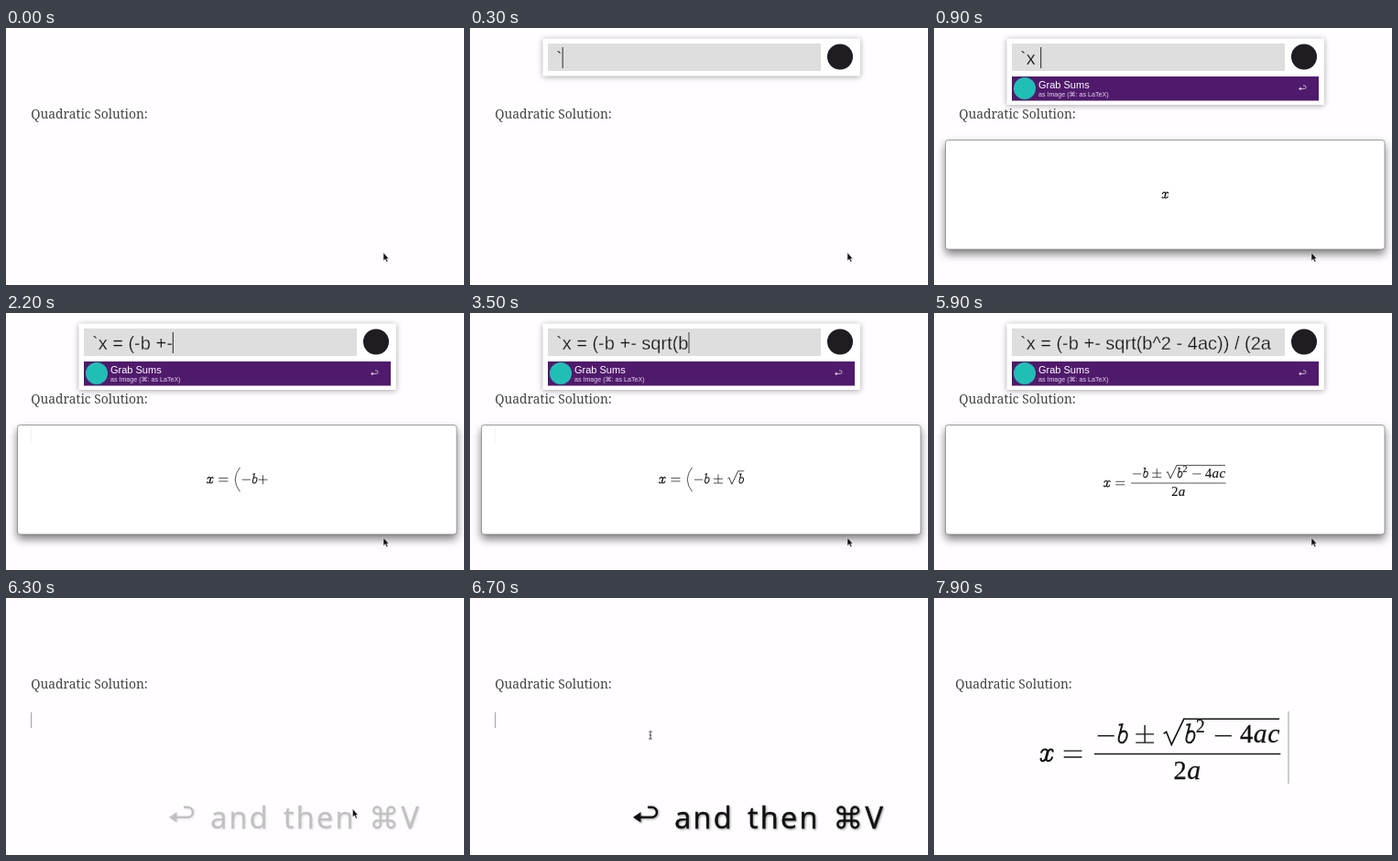
An HTML page for the animation above (8100 ms loop, 500 px wide and 281 px high).

```html
<!DOCTYPE html>
<html lang="en">
<head>
<meta charset="utf-8">
<title>Quadratic solution</title>
<style>
  html, body { margin: 0; width: 100%; height: 100%; overflow: hidden; background: #fffdff; }
  svg { display: block; width: 100vw; height: 100vh; }
  text { white-space: pre; }
  .sans { font-family: "Liberation Sans", Arial, sans-serif; }
  .serif { font-family: "Noto Serif", serif; }
  .big {
    font-family: "Open Sans", "Noto Sans", sans-serif; font-size: 32.5px; letter-spacing: 2.3px;
    stroke: #111; stroke-width: .5px;
  }
  .math { font-family: "Liberation Serif", "Times New Roman", serif; fill: #151515; }
  #search { filter: drop-shadow(0 1px 3px rgba(0, 0, 0, .35)); }
  #preview rect { filter: drop-shadow(0 5px 5px rgba(0, 0, 0, .5)); }
  #hint { filter: drop-shadow(1px 1px 1px rgba(0, 0, 0, .4)); }
</style>
</head>
<body>
<svg viewBox="0 0 500 281">
  <defs>
    <g id="return">
      <path d="M16 0H20.5a5.5 5.5 0 0 1 0 11H7" fill="none" stroke="currentColor" stroke-width="2.5"/>
      <path d="M0 11L8.5 5.2V16.8Z" fill="currentColor"/>
    </g>
  </defs>
  <text id="heading" class="serif" y="99.3" font-size="13.8" fill="#444">Quadratic Solution:</text>

  <g id="preview">
    <rect x="12.5" y="122.5" width="479.5" height="119.5" rx="3" fill="#fff" stroke="#777" stroke-width=".7"/>
    <g id="formula" class="math"></g>
  </g>
  <path id="docCaret" d="M27.5 125V142" stroke="#777" stroke-width=".9"/>

  <g id="search">
    <rect id="panel" x="79.5" y="11.5" width="346.5" height="72.5" rx="1" fill="#fff"/>
    <rect x="85" y="17" width="298" height="30" fill="#dedede"/>
    <text id="query" class="sans" x="94" y="40" font-size="20" fill="#151515" stroke="#dedede" stroke-width=".3"></text>
    <path id="caret" d="M0 21V44" stroke="#222"/>
    <circle cx="404" cy="31.5" r="14" fill="#1f1c22"/>
    <g id="result" class="sans">
      <rect x="85" y="53" width="335" height="26.5" fill="#501a6c"/>
      <circle cx="99" cy="66" r="12" fill="#20bfb6"/>
      <text x="114" y="65.5" font-size="11" fill="#fff">Grab Sums</text>
      <text x="114" y="75" font-size="7.1" fill="#e3d6ea">as Image (<tspan font-family="DejaVu Sans, sans-serif">⌘</tspan>: as LaTeX)</text>
      <use href="#return" transform="translate(398 63) scale(.31)" color="#e8deee"/>
    </g>
  </g>

  <g id="hint" fill="#111">
    <use href="#return" x="178" y="228.7" color="#111"/>
    <text class="big" x="223.2" y="251.8">and</text>
    <text class="big" x="303" y="251.8">then</text>
    <path transform="translate(412.7 239.8) scale(.84)" fill="none" stroke="#111" stroke-width="3"
      d="M-4.5 -9A4.5 4.5 0 1 0 -9 -4.5H9A4.5 4.5 0 1 0 4.5 -9V9A4.5 4.5 0 1 0 9 4.5H-9A4.5 4.5 0 1 0 -4.5 9Z"/>
    <text class="big" x="431.5" y="251.8">V</text>
  </g>

  <g id="pasted" class="math"></g>
  <path id="pasteCaret" d="M387 124V203" stroke="#b4b4b4" stroke-width="1.3"/>
  <path id="arrow" d="M0 0V9L2 7.2L3.6 10.6L5 10L3.6 6.7H6Z" fill="#111" stroke="#fff" stroke-width=".5"/>
  <path id="beam" d="M-1.7 -4H1.7M0 -4V4M-1.7 4H1.7M-1 0H1" fill="none" stroke="#333" stroke-width=".9"/>
</svg>
<script>
const LOOP = 8100, STEP = 100;
const INPUT = "`x = (-b +- sqrt(b^2 - 4ac)) / (2a";
// [time, characters typed]
const TYPING = [[300, 1], [800, 3], [3200, 18], [3450, 18], [4450, 24], [5700, 34]];

const el = {};
document.querySelectorAll("[id]").forEach(e => el[e.id] = e);
const clamp = v => Math.max(0, Math.min(1, v));
const ramp = (t, a, b) => clamp((t - a) / (b - a));
const show = (e, opacity) => e.setAttribute("opacity", +opacity);
const move = (e, x, y) => e.setAttribute("transform", `translate(${x} ${y})`);

// Advance widths and drawn signs, in em
const WIDTH = {
  x: .572, a: .519, b: .429, c: .433, s: .469, q: .46, r: .451, 2: .5, 4: .5, "²": .4,
  "=": .778, "−": .778, "+": .778, "±": .778, "√": .833, "(": .597, ")": .597, "]": 0
};
const SIGN = {
  x: "M.07 -.285C.1 -.39 .18 -.425 .23 -.422C.3 -.415 .31 -.36 .295 -.3L.24 -.09" +
     "C.22 -.03 .18 .005 .13 .005C.08 .005 .055 -.03 .06 -.07L.1 -.09" +
     "M.485 -.15C.46 -.05 .39 .005 .335 .005C.27 .005 .255 -.05 .275 -.12L.33 -.33" +
     "C.35 -.39 .385 -.423 .435 -.423C.49 -.423 .505 -.38 .5 -.35L.465 -.34",
  b: "M.08 -.65L.21 -.67L.09 -.2C.05 -.05 .13 .005 .19 .005C.29 .005 .385 -.14 .385 -.275" +
     "C.385 -.37 .34 -.42 .27 -.42C.21 -.42 .16 -.38 .13 -.33",
  "=": "M.056 -.365H.722M.056 -.135H.722",
  "−": "M.083 -.25H.694",
  "+": "M.056 -.25H.722M.389 -.58V.08",
  "±": "M.056 -.31H.722M.389 -.64V0M.056 0H.722",
  "√": "M.08 -.33L.18 -.4L.37 .08L.835 -.89",
  "(": "M.53 -1.14Q-.16 -.25 .53 .62",
  ")": "M.07 -1.14Q.76 -.25 .07 .62"
};
const WEIGHT = { x: .068, b: .068, "√": .055 };

const stroke = (d, x, y, size, weight = .048) =>
  `<path d="${d}" transform="translate(${x} ${y}) scale(${size})" fill="none" stroke="#151515" stroke-width="${weight}"/>`;

const glyph = (c, x, y, size, style) =>
  `<text x="${x}" y="${y}" font-size="${size}" font-style="${style}" stroke="#151515" stroke-width="${size * .01}">${c}</text>`;

// One line of maths; "]" ends the root
function setLine(str, x, y, size) {
  let pen = 0, root = 0, svg = "";
  [...str].forEach((c, i) => {
    const binary = /[−+±]/.test(c) && /[a-z0-9²]/.test(str[i - 1] || "") && /[a-z0-9√]/.test(str[i + 1] || "");
    const gap = c === "=" ? .278 : binary ? .222 : 0;
    pen += gap;
    const px = x + pen * size;
    if (c === "]") svg += stroke(`M${root - pen} -.87H0`, px, y, size);
    else if (SIGN[c]) svg += stroke(SIGN[c], px, y, size, WEIGHT[c]);
    else if (c === "²") svg += glyph("2", px, y - .363 * size, .68 * size, "normal");
    else if (/\d/.test(c)) svg += glyph(c, px, y, .96 * size, "normal");
    else svg += glyph(c, px, y, size, "italic");
    pen += WIDTH[c] + gap;
    if (c === "√") root = pen - .005;
  });
  return { svg, width: pen * size };
}

function setFormula(input, x, y, size) {
  const s = input.replace(/[` ]/g, "").replace(/sqrt\(?([^)]*)\)?/, "√$1]")
    .replace("+-", "±").replace(/-/g, "−").replace("^2", "²").replace("^", "");
  const parts = s.match(/^x=\((.*)\)\/\(?(.*)$/);
  if (!parts) return setLine(s, x, y, size);
  const pad = .04 * size;
  const head = setLine("x=", x, y, size);
  const left = x + head.width + .12 * size;
  const top = setLine(parts[1], left + pad, y - .67 * size, size);
  const barWidth = top.width + 2 * pad;
  const shift = (barWidth - setLine(parts[2], 0, 0, size).width) / 2;
  const bottom = setLine(parts[2], left + shift, y + .686 * size, size);
  const bar = stroke(`M0 -.25H${barWidth / size}`, left, y, size);
  return { svg: head.svg + top.svg + bottom.svg + bar, width: head.width + barWidth + .24 * size };
}

function typed(t) {
  if (t < TYPING[0][0]) return 0;
  for (let i = 1; i < TYPING.length; i++) {
    const [t0, n0] = TYPING[i - 1], [t1, n1] = TYPING[i];
    if (t < t1) return Math.floor(n0 + (n1 - n0) * (t - t0) / (t1 - t0));
  }
  return INPUT.length;
}

let lastInput = null;
function drawPreview(input) {
  if (input === lastInput) return;
  lastInput = input;
  const size = 15.1, y = input.includes("/") ? 189.8 : 186;
  const width = setFormula(input, 0, y, size).width;
  el.formula.innerHTML = setFormula(input, 252.5 - width / 2, y, size).svg;
}

function draw(t) {
  const open = t >= 100 && t < 6100, done = t >= 6900;
  const blink = clamp(.8 + Math.cos((t - 60) / 1060 * 2 * Math.PI));

  show(el.search, open);
  show(el.result, t >= 400);
  el.panel.setAttribute("height", t >= 400 ? 72.5 : 41);
  el.query.textContent = INPUT.slice(0, typed(t));
  move(el.caret, 94.5 + el.query.getComputedTextLength(), 0);
  show(el.caret, blink);

  show(el.preview, open ? ramp(t, 400, 700) : 0);
  drawPreview(INPUT.slice(0, typed(t - 150)));

  show(el.docCaret, done || t < 1000 ? 0 : open ? .1 * blink : .75);
  show(el.hint, done ? 0 : ramp(t, 6200, 6600));

  const go = ramp(t, 6200, 6600), ease = go * go * (3 - 2 * go);
  const mx = 412 - 215 * ease, my = 245.5 - 95.5 * ease;
  move(el.arrow, mx, my);
  move(el.beam, mx, my);
  show(el.arrow, go < .5);
  show(el.beam, go >= .5 && !done);

  el.heading.setAttribute("x", done ? 23.3 : 27.3);
  show(el.pasted, done);
  show(el.pasteCaret, done ? Math.max(1 - ramp(t, 7100, 7600), ramp(t, 7700, 7900)) : 0);
}

el.pasted.innerHTML = setFormula(INPUT, 114.8, 178, 29.7).svg;
const start = performance.now();
function tick() {
  const t = Math.max(0, performance.now() - start) % LOOP;
  draw(Math.floor(t / STEP) * STEP);
  requestAnimationFrame(tick);
}
tick();
</script>
</body>
</html>
```
